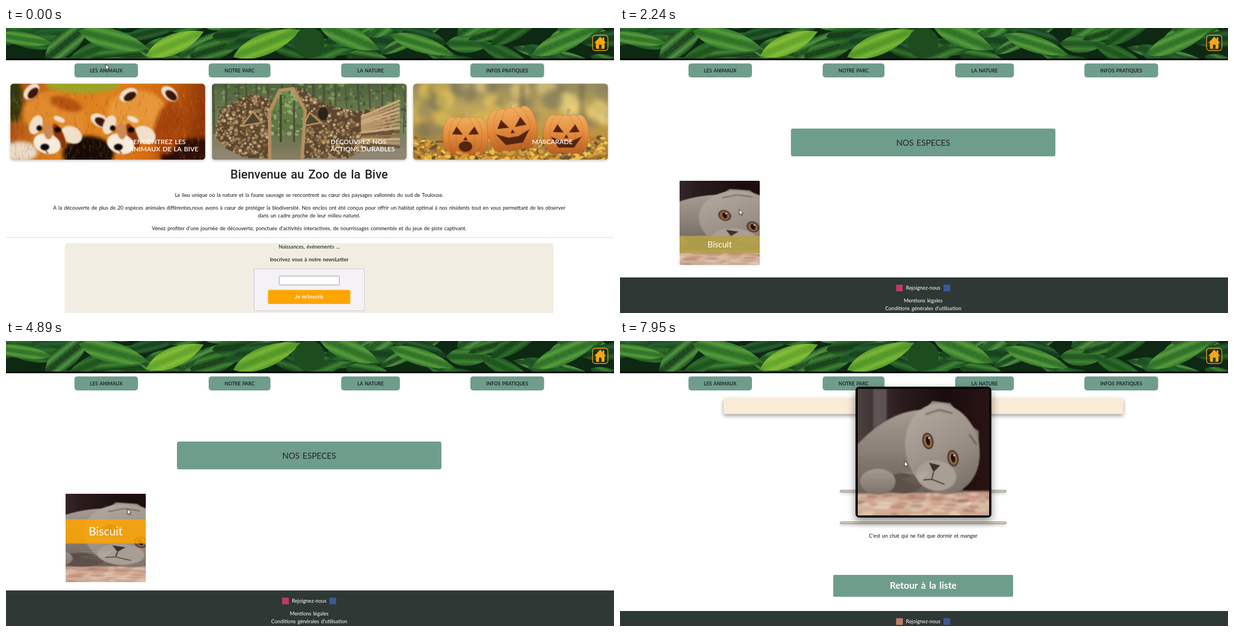
Recreate the animation shown at these times as an HTML page with a canvas. Size 1092 by 513 pixels, loop 8 s.

```html
<!DOCTYPE html>
<html lang="fr">
<head>
<meta charset="utf-8">
<title>Zoo de la Bive</title>
<style>
  html, body { margin: 0; height: 100%; overflow: hidden; background: #fff; }
  canvas { display: block; }
</style>
</head>
<body>
<canvas width="1092" height="513"></canvas>
<script>
const LOOP = 8000, GREEN = '#6f9d8c', INK = '#212529', CREAM = '#f0dfca';
const PET = 'Biscuit';
let c = document.querySelector('canvas').getContext('2d');

// ---------- helpers ----------
let seed = 11;
const rnd = (a = 0, b = 1) => a + (b - a) * (seed = seed * 16807 % 2147483647) / 2147483647;
const pick = list => list[Math.floor(rnd(0, list.length))];
const lerp = (a, b, p) => a + (b - a) * p;
const clamp = p => Math.max(0, Math.min(1, p));
const smooth = p => (p = clamp(p)) * p * (3 - 2 * p);
const ramp = (t, from, to) => smooth((t - from) / (to - from));

function rect(x, y, w, h, fill, radius = 0) {
  c.beginPath();
  c.roundRect(x, y, w, h, radius);
  c.fillStyle = fill;
  c.fill();
}
function outline(color, width = 1) {
  c.strokeStyle = color;
  c.lineWidth = width;
  c.stroke();
}
function shadow(blur, y, color) {
  c.shadowBlur = blur;
  c.shadowOffsetY = y;
  c.shadowColor = color;
}
const noShadow = () => shadow(0, 0, 'transparent');
function blob(fill, x, y, rx, ry = rx, turn = 0) {
  c.beginPath();
  c.ellipse(x, y, rx, ry, turn, 0, 7);
  c.fillStyle = fill;
  c.fill();
}
function poly(fill, ...xy) {
  c.beginPath();
  for (let i = 0; i < xy.length; i += 2) c.lineTo(xy[i], xy[i + 1]);
  c.closePath();
  c.fillStyle = fill;
  c.fill();
}
function line(color, width, x1, y1, x2, y2) {
  c.beginPath();
  c.moveTo(x1, y1);
  c.lineTo(x2, y2);
  outline(color, width);
}
function fade(x1, y1, x2, y2, ...colors) {
  const g = c.createLinearGradient(x1, y1, x2, y2);
  colors.forEach((color, i) => g.addColorStop(i / (colors.length - 1), color));
  return g;
}
function text(str, x, y, { size = 9.29, weight = 400, color = '#111', align = 'center', font = 'Lato' } = {}) {
  c.font = `${weight} ${size}px ${font}, sans-serif`;
  c.wordSpacing = size * 0.1 + 'px';
  c.textAlign = align;
  c.fillStyle = color;
  c.fillText(str, x, y);
}
function layer(w, h, scale, paint) {
  const canvas = document.createElement('canvas'), screen = c;
  canvas.width = w * scale;
  canvas.height = h * scale;
  c = canvas.getContext('2d');
  c.scale(scale, scale);
  paint();
  c = screen;
  return canvas;
}

// ---------- pictures ----------
function leaf(x, y, length, width, turn, dark, light) {
  c.save();
  c.translate(x, y);
  c.rotate(turn);
  c.beginPath();
  c.moveTo(0, 0);
  c.bezierCurveTo(length * .25, -width, length * .7, -width * .8, length, 0);
  c.bezierCurveTo(length * .7, width * .8, length * .25, width, 0, 0);
  c.fillStyle = fade(0, -width * .75, 0, width * .75, dark, light, dark, light, dark);
  c.fill();
  c.clip();
  c.globalAlpha = .4;
  line(light, 1.6, 0, 0, length, 0);
  for (let i = .1; i < 1; i += .1) {
    line(light, .6, length * i, 0, length * (i + .16), -width * .7);
    line(light, .6, length * i, 0, length * (i + .16), width * .7);
  }
  c.restore();
}

const leaves = layer(1092, 55, 1, () => {
  rect(0, 0, 1092, 55, '#0d2813');
  for (let i = 0; i < 56; i++)
    leaf(i * 20 - 50, rnd(-5, 60), rnd(80, 150), rnd(16, 32), rnd(-.7, .5), pick(['#123a17', '#1a4a1c', '#0e2d14']), pick(['#2f6f2a', '#3f8433', '#276030', '#4f9540']));
  [[-20, 12, 105, 18, .15], [130, 5, 130, 28, .25], [560, -8, 120, 28, .4], [690, 12, 120, 22, .3], [945, 48, 130, 26, -.4]]
    .forEach(l => leaf(...l, '#256422', '#569c3c'));
  leaf(252, 50, 112, 26, -.4, '#5a9f24', '#86bd3a');
  leaf(408, 52, 130, 28, -.38, '#478f24', '#7ab636');
});

const pandas = layer(350, 137, 1, () => {
  rect(0, 0, 350, 137, fade(0, 0, 350, 60, '#a34a10', '#d97b1c', '#e08420', '#d36a12', '#8c3408'));
  c.filter = 'blur(3px)';
  blob('#9aa528', 130, 2, 66, 15);
  blob('#35380f', 8, 30, 14, 40);
  blob('#160b06', 140, 126, 46, 32);
  blob('#2b0e05', 330, 130, 60, 32);
  blob('#e08a2c', 80, 60, 58, 44, .3);
  blob('#b4520f', 100, 36, 30, 12, .3);
  blob('#e8973a', 228, 52, 54, 40);
  blob('#a5440c', 285, 80, 26, 48, .2);
  blob('#e9dcc8', 18, 122, 32, 18);
  c.filter = 'none';
  for (let i = 0; i < 900; i++) {
    const x = rnd(0, 350), y = rnd(12, 137);
    line(pick(['#f4ac4a44', '#7a2c0644', '#e0802a44']), 1, x, y, x + rnd(-5, 5), y + rnd(4, 12));
  }
  c.filter = 'blur(1px)';
  for (const [x, y, turn] of [[38, 14, -.8], [160, 66, .5], [212, 20, -.5], [286, 18, .7]]) {
    blob(CREAM, x, y, 17, 11, turn);
    blob('#3b1509', x + 3, y + 3, 12, 7, turn);
  }
  for (const [x, y] of [[64, 88], [196, 88]]) {
    blob(CREAM, x - 18, y - 14, 11, 18, .4);
    blob(CREAM, x + 46, y + 4, 20, 15, .5);
    blob(CREAM, x + 24, y - 24, 11, 5, .4);
    blob('#8c340b', x + 24, y + 6, 8, 24, -.4);
    blob('#f7ebdc', x + 2, y + 20, 25, 18, .3);
    blob('#c98a55', x + 4, y - 2, 8, 14, -.1);
    blob('#0e0705', x - 2, y + 26, 8, 6);
    blob('#0d0705', x + 21, y - 5, 6, 5);
    blob('#0d0705', x - 12, y - 8, 5, 5);
    line('#3b1509', 1.5, x - 2, y + 30, x + 4, y + 38);
  }
});

const woodland = layer(350, 137, 1, () => {
  rect(0, 0, 350, 137, fade(0, 0, 0, 137, '#50663a', '#728059', '#8d8470'));
  for (let i = 0; i < 400; i++) blob(pick(['#3c5430bb', '#6c8449bb', '#8a9f60bb', '#5a5f45bb']), rnd(0, 350), rnd(0, 80), rnd(1, 5), rnd(1, 4));
  for (let i = 0; i < 18; i++) line('#4b4636aa', rnd(2, 5), i * 20 + rnd(0, 9), 0, i * 20 + rnd(0, 9), 90);
  rect(0, 117, 350, 20, '#8f8573');
  c.save();
  poly('#5b4630', 6, 96, 14, 48, 50, 26, 76, 18, 110, 30, 128, 8, 160, 8, 205, 38, 262, 50, 322, 38, 330, 92, 290, 112, 245, 134, 60, 134, 24, 116);
  c.clip();
  for (let i = 0; i < 1500; i++) {
    blob(pick(['#a5875e', '#bc9c70', '#947349', '#cbae84', '#7d5f3d']), rnd(5, 332), rnd(5, 137), rnd(1.6, 3.8));
    outline('#4a3824', .5);
  }
  c.restore();
  for (let i = 0; i < 13; i++) line(pick(['#b8986c', '#94734b', '#c9aa7d', '#6d5436']), 4.5, 268, 60 + i * 4, 338, 30 + i * 7);
  poly('#4a4630', 74, 50, 90, 70, 54, 76);
  outline('#b98f5c', 3);
  poly('#4a4630', 176, 52, 196, 70, 164, 76);
  outline('#b98f5c', 3);
  blob('#2a241a', 200, 54, 9, 12);
  const doorway = [104, 140, 104, 50, 122, 12, 146, 9, 168, 48, 162, 140];
  poly(fade(0, 20, 0, 137, '#6f8a4c', '#5f7344', '#8b7e66'), ...doorway);
  c.save();
  c.clip();
  for (let i = 0; i < 90; i++) blob(pick(['#4a6433bb', '#8ca765bb', '#a5b880bb']), rnd(104, 168), rnd(10, 95), rnd(1, 5), rnd(1, 4));
  line('#3f4b2b', 4, 124, 20, 124, 105);
  line('#4a4a32', 3, 148, 30, 148, 105);
  c.restore();
  poly('#0000', ...doorway);
  outline('#b58f60', 6);
});

const pumpkins = layer(350, 137, 1, () => {
  rect(0, 0, 350, 137, fade(0, 0, 0, 137, '#948a60', '#c2a65a', '#bd9440', '#9c7434'));
  c.filter = 'blur(5px)';
  for (let i = 0; i < 60; i++) blob(pick(['#e2c05599', '#87815c99', '#eed68299', '#77755699']), rnd(0, 350), rnd(0, 85), rnd(6, 20));
  line('#6b644a', 7, 196, 0, 196, 70);
  line('#6b644a', 6, 303, 0, 303, 80);
  c.filter = 'blur(.5px)';
  for (let i = 0; i < 420; i++) {
    const y = rnd(96, 140);
    blob(pick(['#d9a23c', '#b97a2c', '#8d6a38', '#ecc556', '#6d5434']), rnd(0, 350), y, rnd(2, 7), rnd(1, 3.5), rnd(-.8, .8));
  }
  for (const [x, y, r, grin] of [[94, 95, 40, 0], [275, 91, 40, 1], [178, 82, 44, 1]]) {
    c.save();
    c.translate(x, y);
    c.rotate(r > 40 ? -.15 : 0);
    line('#c2aa70', 6, 0, -r * .7, 5, -r * 1.15);
    for (const d of [-.6, .6, -.32, .32, 0])
      blob(fade(0, -r, 0, r, '#f3b464', '#e38a3c', '#b35a20'), d * r, 0, r * .42, r * .88), outline('#a94f1455', 1);
    for (const side of [-1, 1])
      poly('#55240f', side * r * .12, -r * .08, side * r * .6, -r * .1, side * r * .4, -r * .45);
    poly('#55240f', -4, 7, 4, 7, 0, 0);
    if (grin) poly('#55240f', -r * .7, r * .1, -r * .2, r * .32, r * .2, r * .32, r * .7, r * .1, r * .35, r * .6, -r * .35, r * .6);
    else blob('#55240f', 0, r * .45, r * .3, r * .24);
    c.restore();
  }
  for (let i = 0; i < 60; i++) blob(pick(['#ecc04a', '#d39a38']), rnd(0, 350), rnd(122, 140), rnd(4, 8), rnd(2, 4), rnd(-.8, .8));
});

const CAT_W = 236, CAT_H = 228;
const cat = layer(CAT_W, CAT_H, 2, () => {
  rect(0, 0, CAT_W, CAT_H, fade(0, 0, CAT_W, 0, '#4c4140', '#2b1c1d', '#1a0d0e', '#2a1414'));
  c.filter = 'blur(3px)';
  rect(28, 0, 24, 95, '#5d5355');
  rect(-5, 184, CAT_W + 10, 50, fade(0, 184, 0, CAT_H, '#b98d7a', '#dcc0a8', '#c9a58f'));
  for (let i = 0; i < 70; i++) blob(pick(['#c98a7688', '#ead6c088', '#a8776688']), rnd(0, 236), rnd(190, 228), rnd(5, 14), 3);
  c.filter = 'blur(2px)';
  c.beginPath();
  c.moveTo(-5, 105);
  c.bezierCurveTo(40, 55, 90, 30, 140, 40);
  c.lineTo(190, 186);
  c.lineTo(-5, 188);
  c.fillStyle = fade(0, 40, 0, 190, '#a59b91', '#8a7f76', '#6a5f58');
  c.fill();
  blob('#5c5049', 82, 170, 34, 18);
  blob(fade(0, 140, 0, 190, '#a99f95', '#7d726a'), 36, 167, 32, 23);
  poly('#978d83', 116, 42, 134, 22, 166, 26, 180, 44);
  poly('#8a7f76', 196, 62, 217, 76, 217, 104, 206, 112);
  blob(fade(110, 40, 210, 190, '#b0a69c', '#9a8f86', '#756a62'), 152, 108, 66, 82, -.25);
  blob('#a89e94', 141, 156, 36, 27, .15);
  line('#7a6e65', 3, 122, 46, 146, 38);
  line('#7a6e65', 3, 146, 38, 170, 44);
  line('#6f635b', 3, 200, 82, 213, 100);
  c.filter = 'none';
  for (let i = 0; i < 14; i++) line('#d0c8be55', .8, 128 - i % 7 * 2, 150 + i % 7 * 2, 80 + i % 7 * 5, 150 + i * 2);
  c.filter = 'blur(1px)';
  for (const [x, y] of [[126, 94], [171, 125]]) {
    blob('#4d3a30', x, y, 10, 15, -.2);
    blob('#94663f', x, y, 7.5, 12, -.2);
    blob('#1a110d', x, y, 3.5, 8, -.2);
    blob('#fff', x + 2, y - 5, 1.4);
  }
  poly('#3f302c', 128, 133, 148, 138, 136, 150);
  line('#4c3d37', 2, 136, 150, 133, 163);
  line('#4c3d37', 2, 133, 163, 118, 164);
  line('#4c3d37', 2, 133, 163, 156, 172);
  c.filter = 'none';
});

// ---------- shared page parts ----------
function header() {
  c.drawImage(leaves, 0, 0);
  rect(0, 55, 1092, 3, '#000');
  blob('#1d4d1f', 544.5, 27, 28);
  rect(1053.5, 13, 27.5, 27.5, '#0a1c0c66', 5);
  outline('#f5a21b', 1.3);
  poly('#f9a51a', 1067.3, 15.5, 1078, 27, 1056.5, 27);
  rect(1071.5, 17, 3, 7, '#f9a51a');
  rect(1059.5, 26, 15.5, 11.5, '#f9a51a', 1);
  rect(1065, 30, 4.6, 7.5, '#1c3a18');
  [['LES ANIMAUX', 123, 114], ['NOTRE PARC', 364, 111], ['LA NATURE', 602, 105.5], ['INFOS PRATIQUES', 834, 132.5]].forEach(([label, x, w]) => {
    rect(x, 63.7, w, 25.3, GREEN, 5);
    text(label, x + w / 2, 79.5, { size: 8.6, weight: 700, color: INK });
  });
}
function footer(y, badge) {
  rect(0, y, 1092, 513 - y, '#2e3835');
  rect(496, y + 13, 12, 12, badge);
  rect(581, y + 13, 12, 12, '#3b5998');
  const white = { color: '#fff' };
  text('Rejoignez-nous', 544.5, y + 21.5, white);
  text('Mentions légales', 544.5, y + 44.5, white);
  text("Conditions générales d'utilisation", 544.5, y + 58.5, white);
}

// ---------- pages ----------
function card(picture, x, ...lines) {
  shadow(4, 1.5, '#0004');
  rect(x, 100.3, 350, 137, '#fff', 6);
  noShadow();
  c.save();
  c.clip();
  c.drawImage(picture, x, 100.3);
  c.restore();
  lines.forEach((str, i) => text(str, x + 213.5, 209 + i * 12.5, { size: 11.8, weight: 600, color: '#fff', align: 'left' }));
}
function menu(hover) {
  rect(123, 95, 115, 93, '#fff', 5);
  rect(123, 95, 115, 36.5, '#e6eeeb', [5, 5, 0, 0]);
  rect(123, 137, 115, 51, '#e6eeeb', [0, 0, 5, 5]);
  if (hover) rect(128.5, 100, 104, 26, '#a4aaa8', 5);
  ['Nos espèces', 'Les Podcasts de Mr', 'Tatou'].forEach((str, i) =>
    text(str, 134.5, [117, 159.5, 173.5][i], { size: 9.2, weight: 700, align: 'left' }));
}
function home(t) {
  header();
  card(pandas, 7.7, 'RENCONTREZ LES', 'ANIMAUX DE LA BIVE');
  card(woodland, 369.5, 'DÉCOUVREZ NOS', 'ACTIONS DURABLES');
  card(pumpkins, 731.3, 'MASCARADE');
  text('Bienvenue au Zoo de la Bive', 544.5, 271, { size: 21.7, weight: 500, color: INK, font: 'Roboto' });
  text('Le lieu unique où la nature et la faune sauvage se rencontrent au cœur des paysages vallonnés du sud de Toulouse.', 544.5, 303.5);
  text('A la découverte de plus de 20 espèces animales différentes,nous avons à cœur de protéger la biodiversité. Nos enclos ont été conçus pour offrir un habitat optimal à nos résidents tout en vous permettant de les observer', 544.5, 326.5);
  text('dans un cadre proche de leur milieu naturel.', 544.5, 340.5);
  text('Venez profiter d’une journée de découverte, ponctuée d’activités interactives, de nourrissages commentés et du jeux de piste captivant.', 544.5, 363.5);
  rect(0, 376.5, 1092, 1, '#d6d6d6');
  rect(105.5, 387, 878, 130, '#f2ede2', 7);
  text('Naissances, évènements ...', 544.5, 396.5);
  text('Inscrivez vous à notre newsLetter', 544.5, 419.5, { weight: 700, color: '#333' });
  rect(445.5, 433.5, 198, 75.5, '#f4f2f5');
  outline('#c9c9d2');
  rect(490.5, 446.5, 108, 16, '#fff', 1);
  outline('#9a9aa2');
  rect(470.5, 471.5, 148, 25.3, '#ffa500', 3);
  text("Je m'inscris", 544.5, 487, { size: 10, weight: 700, color: '#fff' });
  if (t >= 70) menu(t >= 430);
}

function species(t) {
  header();
  rect(307, 181, 475, 50, GREEN, 4);
  text('NOS ESPECES', 544.5, 212, { size: 14.8, color: INK });

  const hovered = t >= 2000 && t < 2767 || t >= 3640;
  const p = t < 2767 ? ramp(t, 2000, 2500) : t < 3640 ? 1 - ramp(t, 2767, 3267) : ramp(t, 3640, 4140);
  const h = lerp(144.5, 159, p), w = h * 1.76;
  c.save();
  rect(107, 275, 144, h, '#222', 4 * (1 - p));
  c.clip();
  c.drawImage(cat, 179 - w / 2, 275, w, h);
  c.restore();

  const y = lerp(422, 321, p), band = lerp(20, 43.5, p);
  const [r, g, b] = [[111, 255], [157, 165], [140, 0]].map(([from, to]) => lerp(from, to, p));
  rect(107, y, 144, band, `rgba(${r},${g},${b},${lerp(1, .85, p)})`, 3 * (1 - p));
  const size = lerp(9.4, 20.7, p);
  text(PET, 179, y + band / 2 + size * .34, { size, color: hovered ? '#fff' : '#111' });
  footer(449, '#c0376c');
}

function rule(y) {
  shadow(5, 3, '#0004');
  rect(395.5, y, 298, 3, '#faebd7', 1.5);
  noShadow();
  outline('#55524a', .9);
}
function details(t) {
  header();
  shadow(7, 3, '#0006');
  rect(186, 103, 718, 28.5, '#faebd7', 1);
  noShadow();
  text(PET, 544.5, 126, { size: 23.5, color: INK });
  rule(268.8);
  rule(325.8);
  text('Espèce:', 469, 297, { weight: 700, align: 'left' });
  text('Chat Ronron', 505, 297, { align: 'left' });
  rect(561, 287.5, 1.5, 13.5, '#111');
  text('Age:', 574, 297, { weight: 700, align: 'left' });
  text('5 ans.', 596, 297, { align: 'left' });
  text("C'est un chat qui ne fait que dormir et manger", 544.5, 354);
  rect(383, 421, 323, 39.5, GREEN, 2);
  text('Retour à la liste', 544.5, 446, { size: 16.8, weight: 700, color: '#fff' });
  footer(486, '#c07c6c');

  const zoom = lerp(1, 2.14, ramp(t, 6890, 7160));
  c.save();
  c.translate(545, 200);
  c.scale(zoom, zoom);
  shadow(7 * zoom, 3 * zoom, '#0007');
  rect(-57, -55, 114, 110, '#000', 3);
  noShadow();
  c.drawImage(cat, -55.2, -53.3, 110.4, 106.6);
  c.restore();
}

// ---------- pointer: time, x, y ----------
const path = [
  [0, 179, 65], [69, 179, 65], [70, 181, 75], [330, 181, 75], [530, 187, 132], [670, 184, 106],
  [1019, 184, 106], [1020, 191, 108], [1169, 191, 108], [1170, 191, 113], [1290, 192, 112], [1760, 192, 112],
  [2000, 203, 276], [2150, 214, 325], [2500, 215, 330], [2570, 215, 330], [2767, 252, 308], [2930, 306, 293], [3330, 302, 296],
  [3390, 302, 296], [3640, 250, 305], [4140, 218, 302], [5420, 218, 302], [6200, 360, 243],
  [6270, 360, 243], [6410, 420, 228], [6610, 420, 228], [6820, 505, 216], [6890, 515, 215],
  [7160, 519, 215], [7870, 519, 215], [7950, 511, 216], [LOOP, 511, 216]
];
function pointer(t) {
  const i = path.findIndex(k => k[0] > t), [t0, x0, y0] = path[i - 1], [t1, x1, y1] = path[i];
  const p = (t - t0) / (t1 - t0);
  c.save();
  c.translate(lerp(x0, x1, p), lerp(y0, y1, p));
  poly('#fff', 0, 0, 0, 10, 2.3, 8, 4, 11.5, 5.5, 10.8, 4, 7.4, 7, 7);
  outline('#111', .8);
  c.restore();
}

const start = performance.now();
function draw() {
  const t = (performance.now() - start) % LOOP;
  rect(0, 0, 1092, 513, '#fff');
  (t < 1290 ? home : t < 4960 ? species : details)(t);
  pointer(t);
  requestAnimationFrame(draw);
}
draw();
</script>
</body>
</html>
```
